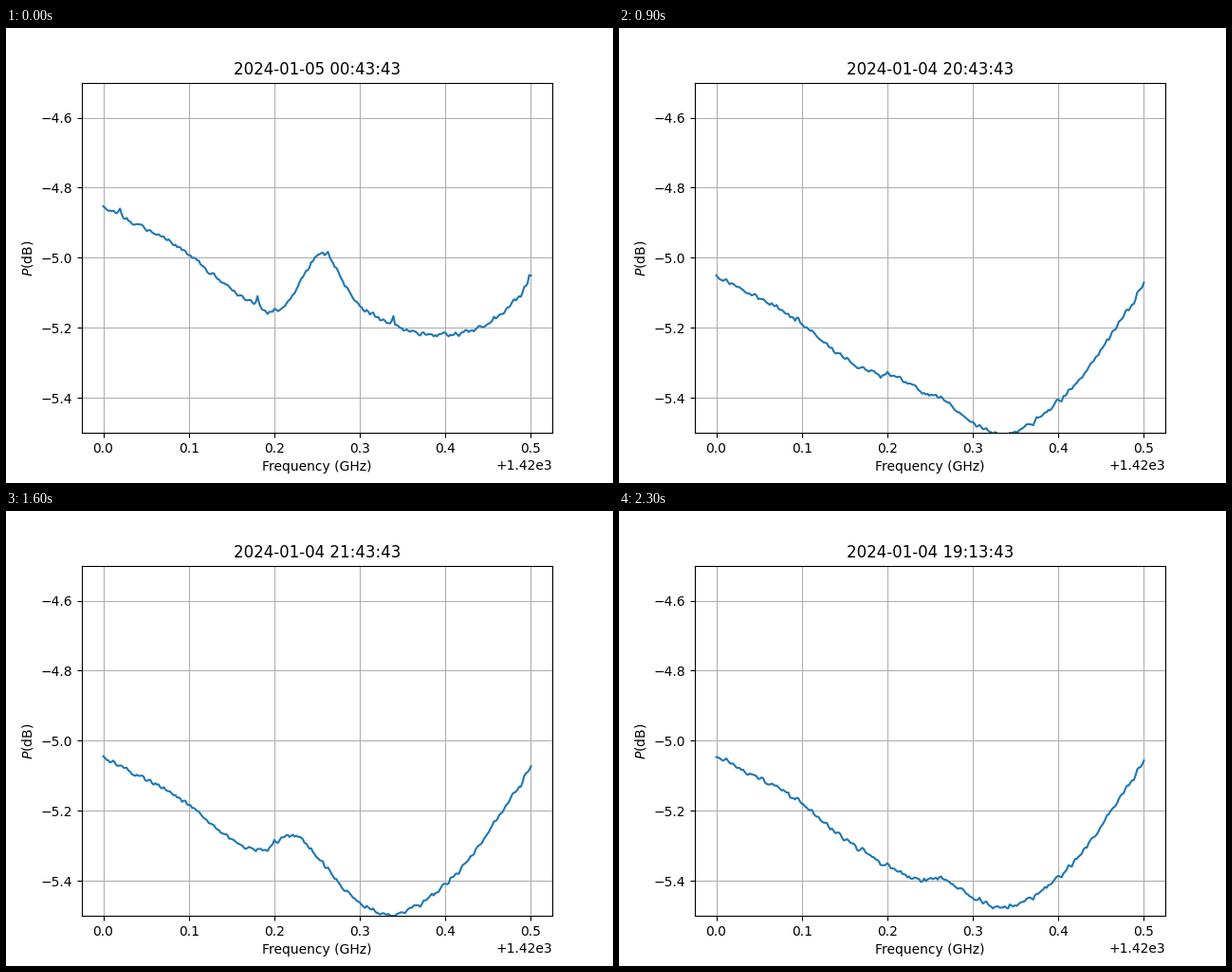
A matplotlib script that plays this animation: 640 by 480 pixels, repeating every 2.4 s.

```python
import numpy as np
import matplotlib.pyplot as plt
from matplotlib.animation import FuncAnimation

FRAMES = 24
INTERVAL = 100
POINTS = 256

# Turning points of the clock: (tick, half-hours after 18:43:43)
TURNS = [(0, 12), (1, 12), (3, 5), (7, 0), (11, 9),
         (13, 12), (14, 11), (18, 2), (20, 4), (23, 1)]

# Receiver passband: (frequency offset, power)
PASSBAND = [(0, -5.04), (0.08, -5.142), (0.16, -5.293),
            (0.22, -5.382), (0.28, -5.417), (0.34, -5.463),
            (0.4, -5.383), (0.45, -5.235), (0.5, -5.047)]

x = np.linspace(0, 0.5, POINTS)


def hermite(points):
    """Smooth curve through the points, sampled at x."""
    px, py = np.array(points).T
    slope = np.gradient(py, px)
    i = np.clip(np.searchsorted(px, x, side="right") - 1, 0, len(px) - 2)
    h = px[i + 1] - px[i]
    t = (x - px[i]) / h
    return ((1 + 2 * t) * (1 - t) ** 2 * py[i]
            + t * (1 - t) ** 2 * h * slope[i]
            + t ** 2 * (3 - 2 * t) * py[i + 1]
            + t ** 2 * (t - 1) * h * slope[i + 1])


def bell(v, center, width):
    return np.exp(-0.5 * ((v - center) / width) ** 2)


def sigmoid(v):
    return 1 / (1 + np.exp(-v))


def noise(seed, size):
    raw = np.random.default_rng(seed).normal(0, size, POINTS + 1)
    return 0.8 * raw[1:] + 0.5 * raw[:-1]


def interference(height):
    lines = np.zeros(POINTS)
    for pos, gain in ((0.02, 0.6), (0.18, 0.9), (0.34, 1.1), (0.499, 0.8)):
        i = np.abs(x - pos).argmin()
        lines[i - 1:i + 2] += height * gain * np.array([0.3, 1, 0.3])
    return lines


BASE = hermite(PASSBAND) + 0.02 * bell(x, 0.263, 0.015) + noise(7, 0.0037)


def spectrum(step):
    settle = 1 - np.exp(-(step / 1.8) ** 2)
    rise = sigmoid((step - 8.4) / 0.7)

    # The low side lifts, with an edge that moves up in frequency
    low = 0.2 * rise - 0.013 * settle
    high = -0.027 * settle
    edge = 0.355 + 0.009 * max(step - 9, 0) ** 2
    drift = high + (low - high) * sigmoid((edge - x) / 0.023)

    # The emission line crosses the beam while its frequency shifts
    line_power = 0.25 * bell(step, 9.7, 3.1)
    emission = line_power * bell(x, 0.198 + 0.0045 * step, 0.024)
    shoulder = 0.125 * np.exp((step - 12) / 1.7) - 0.025 * settle

    return (BASE + drift + emission + shoulder * bell(x, 0.32, 0.04)
            + interference(0.03 * rise) + noise(100 + step, 0.002))


def step_at(tick):
    return int(np.round(np.interp(tick, *zip(*TURNS))))


def stamp(step):
    day, minutes = divmod(18 * 60 + 43 + 30 * step, 24 * 60)
    return f"2024-01-{4 + day:02d} {minutes // 60:02d}:{minutes % 60:02d}:43"


fig, ax = plt.subplots(figsize=(6.4, 4.8), dpi=100)
line, = ax.plot(1420 + x, spectrum(step_at(0)))
title = ax.set_title(stamp(step_at(0)))
ax.set_ylim(-5.5, -4.5)
ax.set_xlabel("Frequency (GHz)")
ax.set_ylabel("$P$(dB)")
ax.grid()


def update(tick):
    step = step_at(tick)
    line.set_ydata(spectrum(step))
    title.set_text(stamp(step))
    return line, title


anim = FuncAnimation(fig, update, frames=FRAMES, interval=INTERVAL,
                     repeat=True, repeat_delay=0)
plt.show()
```
